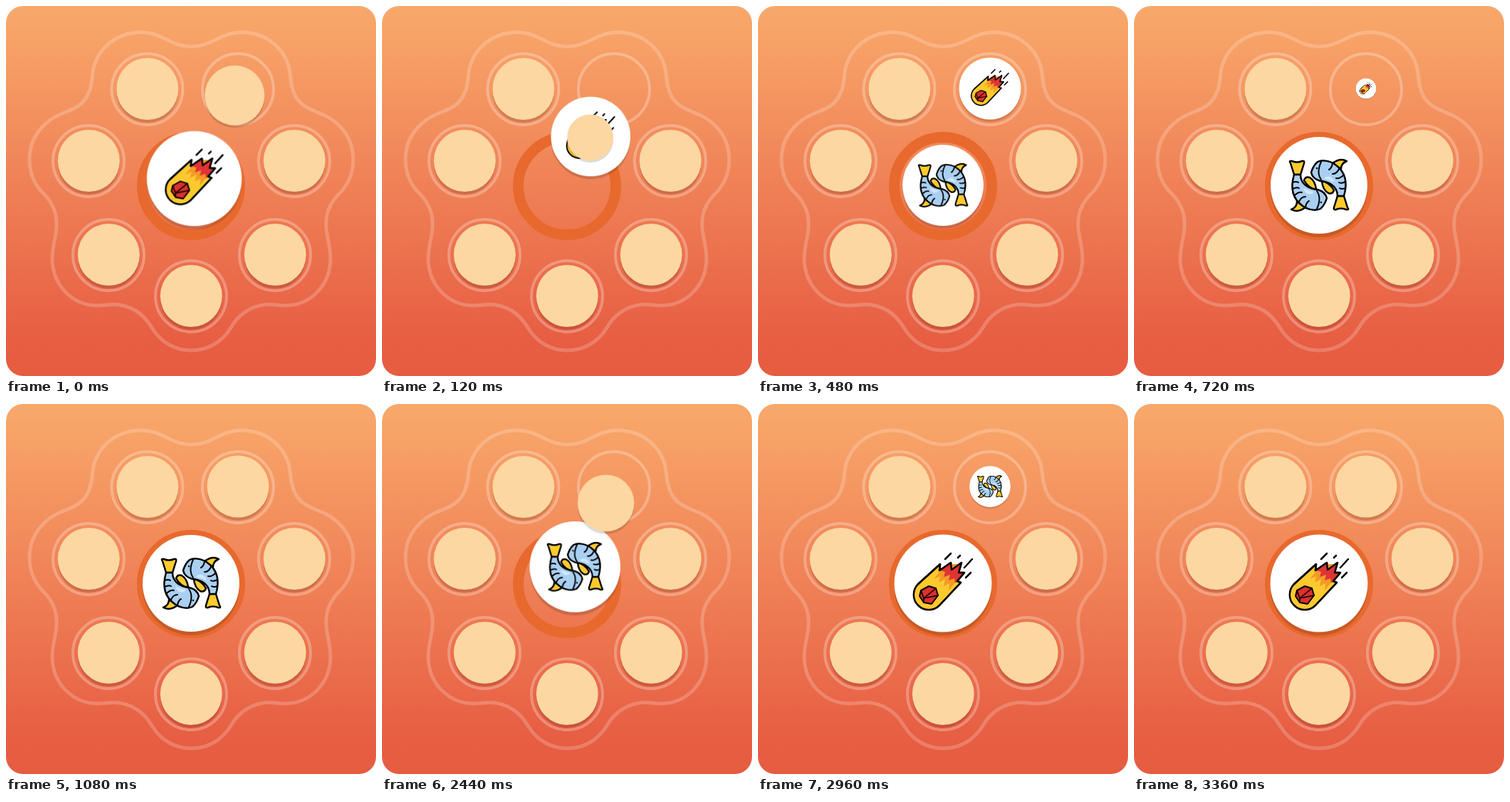
Recreate the animation shown at these times as an HTML page. Size 520 by 520 pixels, loop 4.84 s.

```html
<!DOCTYPE html>
<html lang="en">
<head>
<meta charset="utf-8">
<title>Token swap</title>
<style>
  html, body { margin: 0; width: 100%; height: 100%; overflow: hidden; background: #fff; }
  svg { display: block; width: 100vw; height: 100vh; }

  .ring { fill: none; stroke: #fff; stroke-opacity: .27; stroke-width: 4; }
  .blob { fill: none; stroke: #fff; stroke-opacity: .2; stroke-width: 5; }
  .hub { fill: none; stroke: #e8692d; stroke-width: 15; }
  .shade { fill: #000; fill-opacity: .14; }
  .ink { stroke: #000; stroke-width: 2.5; stroke-linejoin: round; stroke-linecap: round; }
  .line { fill: none; }

  .move { animation: 4840ms linear infinite; }
  #meteor { animation-name: meteor; }
  #fish { animation-name: fish; }
  #cover { animation-name: cover; }

  /* hub = 260,252   slot = 326,116 */
  @keyframes meteor {
    0% { transform: translate(260px, 252px) scale(1); }
    4.958%, 11.57% { transform: translate(326px, 116px) scale(.635); }
    16.529% { transform: translate(326px, 116px) scale(0); }
    16.54%, 55.372% { transform: translate(260px, 252px) scale(0); }
    60.331%, 100% { transform: translate(260px, 252px) scale(1); }
  }
  @keyframes fish {
    0%, 5.785% { transform: translate(260px, 252px) scale(0); }
    10.744%, 49.587% { transform: translate(260px, 252px) scale(1); }
    54.545%, 59.504% { transform: translate(326px, 116px) scale(.64); }
    64.463%, 100% { transform: translate(326px, 116px) scale(0); }
  }
  @keyframes cover {
    0% { transform: translate(326px, 116px) scale(1); }
    4.94% { transform: translate(260px, 252px) scale(.5); }
    4.95%, 17.355% { transform: translate(326px, 116px) scale(0); }
    22.314%, 49.587% { transform: translate(326px, 116px) scale(1); }
    54.53% { transform: translate(260px, 252px) scale(.5); }
    54.54%, 65.289% { transform: translate(326px, 116px) scale(0); }
    69.421%, 100% { transform: translate(326px, 116px) scale(1); }
  }
</style>
</head>
<body>
<svg viewBox="0 0 520 520">
  <defs>
    <linearGradient id="sky" x2="0" y2="1">
      <stop offset="0" stop-color="#f8a86b"/>
      <stop offset=".1" stop-color="#f7a167"/>
      <stop offset=".9" stop-color="#e75e43"/>
      <stop offset="1" stop-color="#e65c41"/>
    </linearGradient>

    <path id="half" class="blob" d="M260.5 57C290 57 301 37 331 37C368 37 397 63 399.5 98C402 128 412 140 437 149
      C468 160 488 184 488 216C488 238 479 254 466 266C453 280 448 297 450.5 316C453 334 456 340 456 355
      C456 392 428 421 392 421C385 421 377 419.5 370 419.5C346 419.5 327 433 316 452C304 472 284 484 260.5 484"/>

    <circle id="ring" class="ring" r="50"/>
    <g id="disc">
      <circle class="shade" cy="4" r="43.5"/>
      <circle r="43.5" fill="#fcd7a2"/>
    </g>

    <g id="swimmer" class="ink">
      <path fill="#fdcb2e" d="M-31 23Q-31 31 -39 34Q-30 39 -19 31Z"/>
      <path fill="#fdcb2e" d="M-40 -31Q-43 -35 -38 -34Q-31 -31 -24 -34Q-20 -35 -21 -31L-26 -15H-35Z"/>
      <path fill="#a9cff1" d="M-35 -15C-41 5 -37 19 -23 29C-15 35 -4 36 2 33Q8 28 11 18Q9 9 -2 6C-15 5 -26 -2 -26 -15Z"/>
      <path fill="#d2e7fa" stroke="none" d="M-22 4Q-14 8 -7 9Q-10 14 -16 12Q-21 9 -22 4Z"/>
      <path fill="#fdcb2e" d="M-21 -7Q-19 -13 -13 -11Q-5 -6 -4 6Q-15 4 -21 -7Z"/>
      <path class="line" stroke-width="2" d="M-37 -4Q-32 -6 -29 -4M-37 5Q-31 2 -28 4M-34 14Q-29 9 -24 10M-28 23Q-25 16 -19 16M-19 31Q-18 24 -14 22M-3 8Q4 18 -3 33"/>
      <circle cx="3" cy="24" r="1.2" fill="#000" stroke="none"/>
    </g>
  </defs>

  <rect width="520" height="520" rx="24" fill="url(#sky)"/>
  <use href="#half"/>
  <use href="#half" transform="translate(521) scale(-1 1)"/>
  <circle class="hub" cx="260" cy="253" r="68.5"/>

  <g id="slots">
    <use href="#ring" x="326" y="117"/>
  </g>

  <g id="meteor" class="move">
    <circle class="shade" cy="5" r="68.5"/>
    <circle r="68.5" fill="#fff"/>
    <g class="ink">
      <path fill="#fdc92f" d="M-35 1L-4 -27L-5 -18L11 -29L12 -19L26 -29L22 -15L30 -15L20 -3L25 -1L-5 31A21 21 0 1 1 -35 1Z"/>
      <path fill="#f39a27" stroke="none" d="M-13 -6L-4 -17L10 -27L25 -27L20 -15L28 -14L17 -1L8 10L9 0L1 4L3 -6L-6 -1L-4 -10Z"/>
      <path fill="#df3334" stroke="none" d="M-3 -18L10 -28L12 -18L25 -28L21 -14L29 -14L17 0L16 -7L8 -4L10 -12L1 -9L3 -16Z"/>
      <path class="line" d="M-35 1L-4 -27L-5 -18L11 -29L12 -19L26 -29L22 -15L30 -15L20 -3L25 -1L-5 31"/>
      <path fill="#da302e" stroke-width="2" d="M-31 10L-20 4L-10 7L-7 17L-16 29L-27 27L-33 18Z"/>
      <path class="line" stroke-width="1.6" d="M-31 10L-27 21L-10 7M-27 21L-27 27M-27 21L-7 17"/>
      <path class="line" d="M3 -34L11 -42M21 -36L24 -39M30 -22L41 -34M32 -8L39 -15"/>
    </g>
  </g>

  <g id="fish" class="move">
    <circle class="shade" cy="5" r="68"/>
    <circle r="68" fill="#fff"/>
    <use href="#swimmer"/>
    <use href="#swimmer" transform="rotate(180)"/>
  </g>

  <use id="cover" class="move" href="#disc"/>
</svg>
<script>
  const slots = document.getElementById('slots');
  const spots = [[198.5, 117], [405, 218], [378, 350], [260, 408], [144, 350], [116, 218]];

  function place(id, x, y) {
    const use = document.createElementNS('http://www.w3.org/2000/svg', 'use');
    use.setAttribute('href', id);
    use.setAttribute('x', x);
    use.setAttribute('y', y);
    slots.append(use);
  }

  for (const [x, y] of spots) {
    place('#ring', x, y);
    place('#disc', x + .3, y - .5);
  }
</script>
</body>
</html>
```
